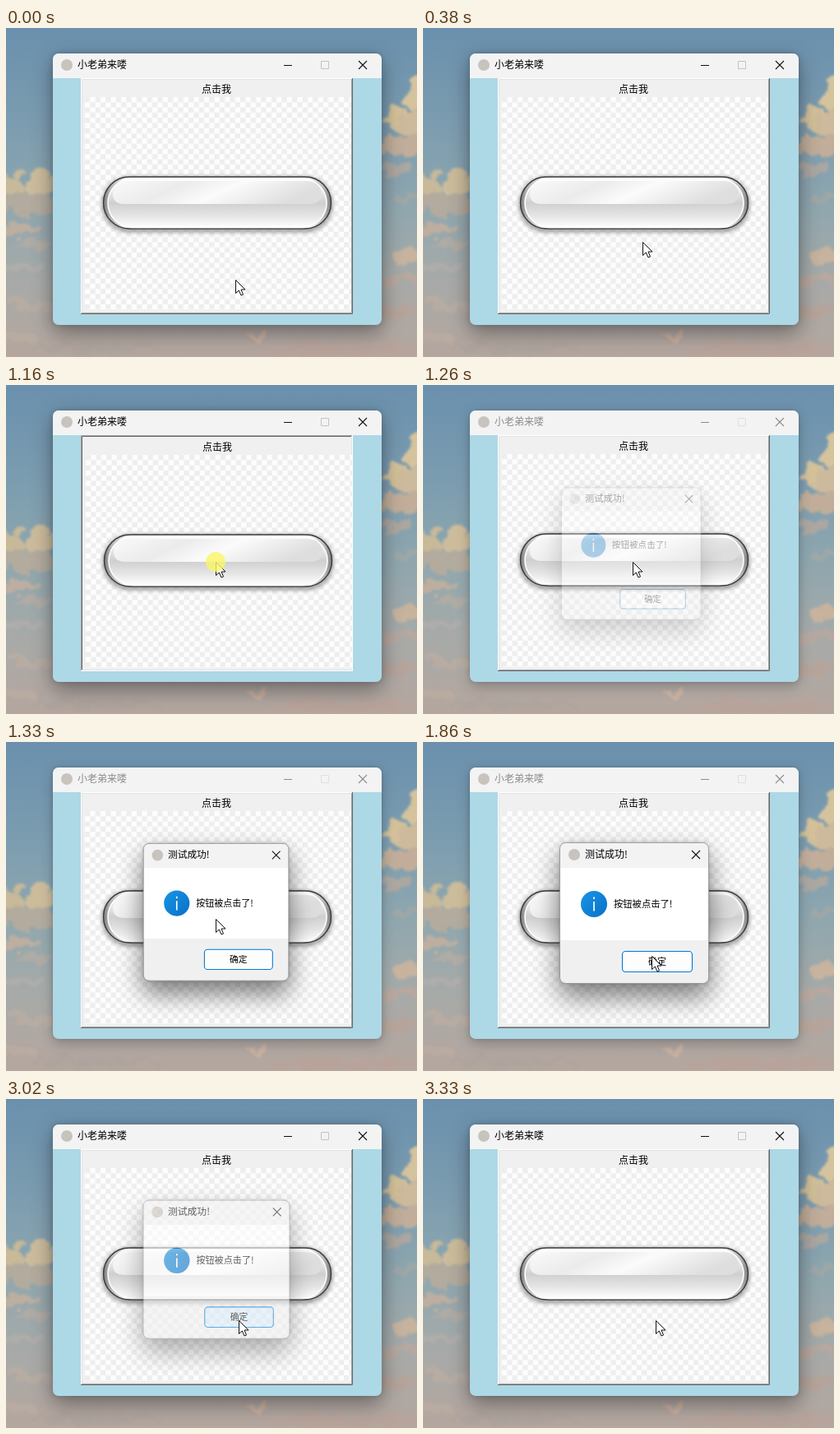
Animation, 500 px wide and 400 px high, one loop 3420 ms. Source, as an HTML page:

```html
<!DOCTYPE html>
<html lang="zh-CN">
<head>
<meta charset="utf-8">
<title>点击我</title>
<style>
  html, body { margin: 0; width: 100%; height: 100%; overflow: hidden; }
  svg { display: block; }
  text { font: 12px "Noto Sans CJK SC", "Noto Sans CJK", sans-serif; fill: #000; }
  .mid { text-anchor: middle; }
  .line { fill: none; stroke: #111; stroke-width: 1.1; }
  .box { fill: none; stroke: #c3c3c3; }
  .edge { fill: none; }
  .frame { filter: drop-shadow(0 9px 13px rgb(20 20 25 / .38)) drop-shadow(0 0 3px rgb(20 20 25 / .22)); }
  .inactive .frame { filter: drop-shadow(0 5px 8px rgb(20 20 25 / .24)) drop-shadow(0 0 2px rgb(20 20 25 / .18)); }
  .inactive .title { fill: #8c8c8c; }
  .inactive .line { stroke: #8c8c8c; }
  .inactive .box { stroke: #e0e0e0; }
  #dialog { transform-origin: 198px 160px; }
  .panel { filter: drop-shadow(0 15px 16px rgb(0 0 0 / .45)) drop-shadow(0 0 2px rgb(0 0 0 / .25)); }
</style>
</head>
<body>
<svg width="500" height="400" viewBox="0 0 500 400">
  <defs>
    <linearGradient id="sky" x2="0" y2="1">
      <stop stop-color="#6a90ad"/><stop offset=".3" stop-color="#7c9db0"/>
      <stop offset=".55" stop-color="#90a7ae"/><stop offset=".78" stop-color="#a8aaa8"/>
      <stop offset="1" stop-color="#b5a69e"/>
    </linearGradient>
    <filter id="paint" filterUnits="userSpaceOnUse" x="-40" y="-40" width="580" height="480" color-interpolation-filters="sRGB">
      <feTurbulence type="fractalNoise" baseFrequency=".05" numOctaves="3" seed="4"/>
      <feDisplacementMap in="SourceGraphic" scale="28" xChannelSelector="R" yChannelSelector="G"/>
      <feGaussianBlur stdDeviation="1.6"/>
    </filter>
    <filter id="soft"><feGaussianBlur stdDeviation="2"/></filter>
    <pattern id="checker" x="96" y="84" width="12.6" height="12.6" patternUnits="userSpaceOnUse">
      <path fill="#fdfdfd" d="M0 0h12.6v12.6H0z"/>
      <path fill="#eee" d="M0 0h6.3v6.3H0zM6.300 6.300h6.300v6.300H6.300z"/>
    </pattern>
    <linearGradient id="metal">
      <stop stop-color="#808080"/><stop offset=".03" stop-color="#b4b4b4"/><stop offset=".09" stop-color="#eee"/>
      <stop offset=".91" stop-color="#eee"/><stop offset=".97" stop-color="#b4b4b4"/><stop offset="1" stop-color="#808080"/>
    </linearGradient>
    <linearGradient id="glass" x2="0" y2="1">
      <stop stop-color="#fff"/><stop offset=".2" stop-color="#f1f1f1"/><stop offset=".5" stop-color="#cfcfcf"/>
      <stop offset=".75" stop-color="#e4e4e4"/><stop offset="1" stop-color="#fff"/>
    </linearGradient>
    <linearGradient id="gloss" y2=".25">
      <stop stop-color="#fafafa"/><stop offset=".35" stop-color="#ebebeb"/>
      <stop offset=".6" stop-color="#fbfbfb"/><stop offset="1" stop-color="#dedede"/>
    </linearGradient>
    <linearGradient id="blue" x2="1" y2="1">
      <stop stop-color="#1a95e4"/><stop offset="1" stop-color="#0870c8"/>
    </linearGradient>
    <clipPath id="windowClip"><rect x="57" y="31" width="400" height="330" rx="7"/></clipPath>
    <clipPath id="dialogClip"><rect x="166.5" y="122.5" width="181" height="171" rx="7"/></clipPath>
  </defs>

  <rect width="500" height="400" fill="url(#sky)"/>
  <g id="clouds" filter="url(#paint)" opacity=".85"></g>

  <g id="window">
    <rect class="frame" x="57" y="31" width="400" height="330" rx="7" fill="#add8e6"/>
    <path clip-path="url(#windowClip)" fill="#f3f3f3" d="M57 31h400v30H57z"/>
    <circle cx="74" cy="45" r="7" fill="#c8c3bd"/>
    <text class="title" x="87" y="49">小老弟来喽</text>
    <path class="line" d="M338 45.5h10M429 40l10 10m0-10-10 10"/>
    <path class="box" d="M383.5 40.5h9v9h-9z"/>

    <path fill="#f0f0f0" d="M91 61h331v287H91z"/>
    <path class="edge" d="M91.5 347V61.5H421"/>
    <path class="edge" d="M92.5 346V62.5H420"/>
    <path class="edge" d="M92 346.5H420.5V62"/>
    <path class="edge" d="M91 347.5H421.5V61"/>
    <g id="face">
      <text class="mid" x="256" y="79">点击我</text>
      <path fill="url(#checker)" d="M96 84h324v259H96z"/>
      <rect x="116" y="180" width="282" height="69" rx="34" fill="#777" opacity=".6" filter="url(#soft)"/>
      <rect x="118.5" y="181" width="277" height="63" rx="31.5" fill="url(#metal)" stroke="#3c3c3c" stroke-width="1.5"/>
      <rect x="124" y="183" width="266" height="59.5" rx="29.7" fill="url(#glass)" stroke="#fff" stroke-width="1.6"/>
      <path fill="url(#gloss)" d="M148 186H366C378 186 384 195 384 202C384 210 378 214 370 214H144C135 214 130 210 130 202C130 195 136 186 148 186Z"/>
    </g>
  </g>

  <g id="dialog">
    <rect class="panel" x="166.5" y="122.5" width="181" height="171" rx="7" fill="#f0f0f0"/>
    <g clip-path="url(#dialogClip)">
      <path fill="#f3f3f3" d="M166 122h182v31H166z"/>
      <path fill="#fff" d="M166 153h182v88H166z"/>
    </g>
    <rect x="166.5" y="122.5" width="181" height="171" rx="7" fill="none" stroke="#8d8d8d" stroke-width=".8"/>
    <circle cx="184" cy="137" r="7" fill="#c8c3bd"/>
    <text x="197" y="141">测试成功!</text>
    <path class="line" d="M327 132l10 10m0-10-10 10"/>
    <circle cx="208" cy="197" r="16" fill="url(#blue)"/>
    <path fill="none" stroke="#fff" stroke-width="1.7" d="M208 194v11.5M208 188.5v2.5"/>
    <text x="232" y="201" style="font-size:11.3px">按钮被点击了!</text>
    <rect id="ok" x="242.5" y="254.5" width="85" height="25" rx="4" stroke="#0078d4" stroke-width="1.1"/>
    <text class="mid" x="285" y="271" style="font-size:11px">确定</text>
  </g>

  <g id="pointer">
    <path fill="#fff" stroke="#111" stroke-linejoin="round" d="M.5.5V16.5L4.300 13 7 19 9.500 18 7 12H12Z"/>
    <circle id="click" r="12" fill="#faf668" opacity=".8"/>
  </g>
</svg>
<script>
const LOOP = 3420;
const $ = id => document.getElementById(id);

// x, y, rx, ry, colour
const clouds = [
  [6, 196, 20, 20, '#d3bd96'], [46, 188, 20, 14, '#d8c199'], [24, 212, 40, 12, '#b9ac9c'],
  [14, 246, 26, 8, '#c4b09e'], [40, 264, 24, 5, '#b3aca4'], [10, 290, 34, 6, '#b2aeaa'],
  [34, 338, 32, 6, '#bbada2'], [10, 374, 30, 8, '#bcaca2'],
  [498, 76, 15, 22, '#e6cb9a'], [474, 108, 16, 14, '#e4c896'], [496, 116, 20, 18, '#dcbf99'],
  [484, 142, 26, 14, '#cdb096'], [470, 172, 20, 7, '#b3a89f'], [490, 206, 20, 5, '#a2a8a6'],
  [488, 278, 18, 8, '#ceb59c'], [480, 306, 30, 7, '#b9a89e'], [482, 346, 36, 8, '#b8a49a'],
  [302, 375, 12, 3, '#d2b4a0'], [410, 392, 90, 8, '#b9a39a'], [110, 390, 80, 6, '#aea49e']
];
$('clouds').innerHTML = clouds.map(([x, y, rx, ry, fill]) =>
  `<ellipse cx="${x}" cy="${y}" rx="${rx}" ry="${ry}" fill="${fill}"/>`).join('');

// time, x, y
const path = [
  [0, 279, 306], [70, 279, 306], [530, 261, 238], [620, 259, 231], [770, 256, 217],
  [860, 255, 215], [1550, 255, 215], [1860, 278, 260], [2090, 283, 269], [LOOP, 283, 269]
];

// Bevel colours: outer and inner top left, inner and outer bottom right
const raised = ['#fff', '#e3e3e3', '#a0a0a0', '#696969'];
const sunken = ['#a0a0a0', '#696969', '#e3e3e3', '#fff'];
const edges = document.querySelectorAll('.edge');

const ramp = (t, from, to) => Math.min(1, Math.max(0, (t - from) / (to - from)));
const within = (t, from, to) => t >= from && t < to;

function pointerAt(t) {
  const i = path.findIndex(key => key[0] > t);
  const [t0, x0, y0] = path[i - 1], [t1, x1, y1] = path[i];
  const k = ramp(t, t0, t1);
  return [x0 + (x1 - x0) * k, y0 + (y1 - y0) * k].map(Math.round);
}

function draw(t) {
  $('pointer').setAttribute('transform', `translate(${pointerAt(t)})`);
  const pressed = within(t, 1090, 1260);
  $('click').style.display = pressed || within(t, 2810, 2950) ? '' : 'none';
  $('face').setAttribute('transform', pressed ? 'translate(1 1)' : '');
  edges.forEach((edge, i) => edge.setAttribute('stroke', (pressed ? sunken : raised)[i]));

  $('window').setAttribute('class', within(t, 1260, 2950) ? 'inactive' : '');
  const opening = ramp(t, 1230, 1330), closing = ramp(t, 2910, 3190);
  const dialog = $('dialog').style;
  dialog.display = within(t, 1230, 3190) ? '' : 'none';
  dialog.opacity = opening * (1 - closing);
  const scale = (.92 + .055 * opening + .025 * ramp(t, 1330, 1410)) * (1 - .043 * closing);
  dialog.transform = `scale(${scale})`;
  $('ok').setAttribute('fill', t > 2810 ? '#d9ebf9' : t > 1950 ? '#e6f2fb' : '#fdfdfd');
}

const start = performance.now();
function tick() {
  draw((performance.now() - start) % LOOP);
  requestAnimationFrame(tick);
}
tick();
</script>
</body>
</html>
```
